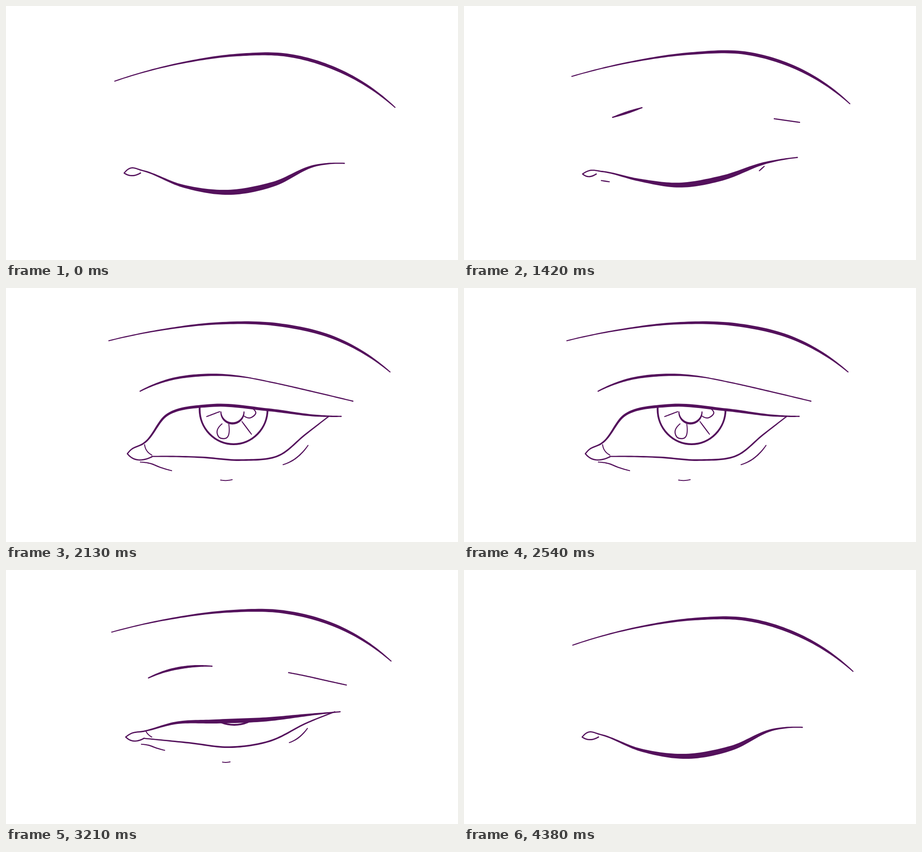
These frames come from a looping animation (998 px wide and 561 px high, 4.54 s). An HTML page with a canvas:

```html
<!DOCTYPE html>
<html lang="en">
<head>
<meta charset="utf-8">
<title>Opening eye</title>
<style>
html, body { margin: 0; width: 100%; height: 100%; overflow: hidden; background: #fff; }
canvas { display: block; width: 100vw; height: 100vh; }
</style>
</head>
<body>
<canvas id="stage" width="998" height="561"></canvas>
<script>
const ctx = document.getElementById('stage').getContext('2d');
const LOOP = 4540, MIRROR = 4880, INK = '#54115c';

// Key points (x, y, ...) of the poses: 0 shut, 1 loosened, 2 wide open
const brow = [
  [240,166, 390,125.5, 510,108.3, 620,108.5, 740,144.5, 859,224],
  [238,155.5, 370,123.5, 500,105, 620,103.8, 740,140, 852,216],
  [227,112, 350,87, 470,73.5, 600,76.5, 730,108, 848,181]
];
const lid = [
  [261,369, 275,358, 300,363, 390,397.5, 490,411.5, 590,393.5, 685,352, 747,347.5],
  [262,371, 277,363.5, 305,365.5, 385,384, 475,395.5, 570,380, 668,346, 736,334.5],
  [268,366, 275,358, 303,343.5, 357,275, 450,250.5, 580,261, 690,281.5, 740,283.5]
];
const hook = [
  [261,369, 272,374, 297,368.8],
  [262,371, 269,375.5, 292,371],
  [268,366, 275,373, 322,373]
];
const lower = [
  [...hook[1].slice(-2), ...lid[1].slice(6)],
  [322,373, 430,378.5, 520,385.5, 602,374, 660,326, 712,284]
];

// Skin folds: a short dash (two ends) grows into a curve
const creases = [
  { dash: [328,246, 393,224.5], full: [296,228, 360,201.5, 440,189.5, 540,196], swell: 3 },
  { dash: [685,249, 741,257], full: [540,196, 600,209, 680,229, 766,250], swell: .2 }
];
const bags = [
  { dash: [303,385.5, 321,388.3], full: [293,384, 325,388.5, 355,401, 391,412], swell: .6 },
  { dash: [652,364, 663,354], full: [589,405, 622,391, 648,370, 669,344], swell: .6 },
  { dash: [486,424.5, 486,424.5], full: [467,424, 487,425.5, 507,422.5], swell: 0 }
];

const rays = [[443,284, 472,273], [521,295, 542,323]];
const shine = [528,280, 540,284, 553.5,273, 543,261];
const petal = [479,297, 468.5,319, 473,327, 485,329.5, 494,298];
const duct = [306,346, 310,358, 322,369];

const opening = [[0, 0], [500, 0], [790, -.13], [1040, -.13], [1300, .34], [1420, 1], [1580, 1.24], [2000, 2]];

const clamp = (v, a = 0, b = 1) => Math.min(b, Math.max(a, v));
const lerp = (a, b, k) => a + (b - a) * k;
const mix = (a, b, k) => a.map((v, i) => lerp(v, b[i], k));
const shift = (pts, dx, dy) => pts.map((v, i) => v + (i % 2 ? dy : dx));
const smooth = k => k * k * (3 - 2 * k);

function hermite(a, b, m, n, h, k) {
  const r = 1 - k;
  return a * (1 + 2 * k) * r * r + b * k * k * (3 - 2 * k) + h * k * r * (m * r - n * k);
}

// Monotone curve through the keys
function ease(keys, t) {
  const last = keys.length - 1;
  if (t >= keys[last][0]) return keys[last][1];
  const secant = i => i < 0 || i >= last ? 0
    : (keys[i + 1][1] - keys[i][1]) / (keys[i + 1][0] - keys[i][0]);
  const slope = i => {
    const a = secant(i - 1), b = secant(i);
    return a * b > 0 ? 2 * a * b / (a + b) : 0;
  };
  const i = keys.findIndex(key => key[0] > t) - 1;
  const [t0, a] = keys[i], [t1, b] = keys[i + 1];
  return hermite(a, b, slope(i), slope(i + 1), t1 - t0, (t - t0) / (t1 - t0));
}

function morph(poses, pose) {
  const i = clamp(Math.floor(pose), 0, poses.length - 2);
  return mix(poses[i], poses[i + 1], pose - i);
}

// Bend the part between the eye corners up or down
function bend(pts, amount) {
  return pts.map((v, i) =>
    i % 2 ? v + amount * Math.sin(Math.PI * clamp((pts[i - 1] - 300) / 400)) : v);
}

// Chord-length spline, sampled as [x, y, share of length]
function curve(pts) {
  const n = pts.length / 2, steps = 16, out = [];
  const p = Array.from({ length: n }, (_, i) => [pts[2 * i], pts[2 * i + 1]]);
  const h = p.slice(1).map((b, i) => Math.hypot(b[0] - p[i][0], b[1] - p[i][1]) || 1e-6);
  const total = h.reduce((a, b) => a + b, 0);
  const chord = (i, o) => (p[i + 1][o] - p[i][o]) / h[i];
  const tilt = (i, o) => {
    if (n < 3) return chord(0, o);
    const j = clamp(i, 1, n - 2), a = chord(j - 1, o), b = chord(j, o);
    const m = (a * h[j] + b * h[j - 1]) / (h[j - 1] + h[j]);
    return i < j ? 2 * a - m : i > j ? 2 * b - m : m;
  };
  let done = 0;
  for (let i = 0; i < n - 1; i++) {
    for (let s = i ? 1 : 0; s <= steps; s++) {
      const k = s / steps;
      const [x, y] = [0, 1].map(o => hermite(p[i][o], p[i + 1][o], tilt(i, o), tilt(i + 1, o), h[i], k));
      out.push([x, y, (done + h[i] * k) / total]);
    }
    done += h[i];
  }
  return out;
}

// Stroke with round ends that swells between them; skew moves the swelling right
function brush(pts, base, swell = 0, skew = 1, power = 1) {
  const c = curve(pts), n = c.length - 1;
  if (Math.hypot(c[n][0] - c[0][0], c[n][1] - c[0][1]) < 3) return;
  const side = c.map(([, , u], i) => {
    const a = c[Math.max(0, i - 1)], b = c[Math.min(n, i + 1)];
    const bulge = Math.abs(Math.sin(Math.PI * u ** skew)) ** power;
    const k = (base + swell * bulge) / 2 / (Math.hypot(b[0] - a[0], b[1] - a[1]) || 1);
    return [(a[1] - b[1]) * k, (b[0] - a[0]) * k];
  });
  ctx.beginPath();
  c.forEach((p, i) => ctx.lineTo(p[0] + side[i][0], p[1] + side[i][1]));
  for (let i = n; i >= 0; i--) ctx.lineTo(c[i][0] - side[i][0], c[i][1] - side[i][1]);
  ctx.fill();
  for (const p of [c[0], c[n]]) {
    ctx.beginPath();
    ctx.arc(p[0], p[1], base / 2, 0, 7);
    ctx.fill();
  }
}

// size 0..1 grows the dash from its middle, k turns it into the full curve
function fold({ dash: [x0, y0, x1, y1], full }, size, k) {
  const last = full.length / 2 - 1;
  const line = full.map((_, i) => {
    const u = .5 + ((i >> 1) / last - .5) * size;
    return i % 2 ? lerp(y0, y1, u) : lerp(x0, x1, u);
  });
  return mix(line, full, k);
}

function iris(settle) {
  ctx.beginPath();
  ctx.ellipse(504 - 1.5 * settle, 270 - 2 * settle, 74 + settle, 72 + 5 * settle, 0, 0, 2 * Math.PI);
  ctx.lineWidth = 4;
  ctx.stroke();

  const over = .5 * (1 - settle), pupil = [];
  for (let i = 0; i <= 8; i++) {
    const a = lerp(Math.PI + over, -over, i / 8);
    pupil.push(501 + 25.5 * Math.cos(a), 270.5 + 25.5 * Math.sin(a));
  }
  brush(shift(pupil, -settle, 3 * settle), 2.2, 2.6);
  for (const s of [shine, petal]) brush(shift(s, -2 * settle, 3 * settle), 2, .5);
  rays.forEach(s => brush(s, 2, .4));
}

function draw(time) {
  const t = Math.min(time, MIRROR - time);
  const pose = ease(opening, t), open = clamp(pose - 1);
  const settle = smooth(clamp((t - 2000) / 130));
  ctx.fillStyle = '#fff';
  ctx.fillRect(0, 0, 998, 561);
  ctx.fillStyle = ctx.strokeStyle = INK;

  const top = bend(morph(lid, pose), 10 * settle);
  const corner = morph(hook, pose);
  if (open) {
    const base = bend(morph(lower, open), -5.5 * settle);
    ctx.save();
    ctx.beginPath();
    for (const [x, y] of curve(top)) ctx.lineTo(x, y);
    for (const pts of [base, corner]) {
      for (const [x, y] of curve(pts).reverse()) ctx.lineTo(x, y);
    }
    ctx.clip();
    iris(settle);
    brush(duct, 2.1);
    ctx.restore();
    brush(base, 2.5, 1.1);
  }
  brush(shift(morph(brow, pose), 0, 4.5 * settle), 2.2, 5, 1.7);
  brush(top, 2.5, lerp(9.4, 4.2, open), lerp(1.2, 1.1, open), 2 - open);
  brush(corner, 2.7);

  const size = clamp((pose - .8) / .2);
  for (const s of creases) brush(bend(fold(s, size, open), 3 * settle), 2.4, s.swell);
  for (const s of bags) brush(fold(s, size, open * (1 - .36 * settle)), 2, s.swell);
}

let start;
function tick(now) {
  start ??= now;
  draw((now - start) % LOOP);
  requestAnimationFrame(tick);
}
draw(0);
requestAnimationFrame(tick);
</script>
</body>
</html>
```
